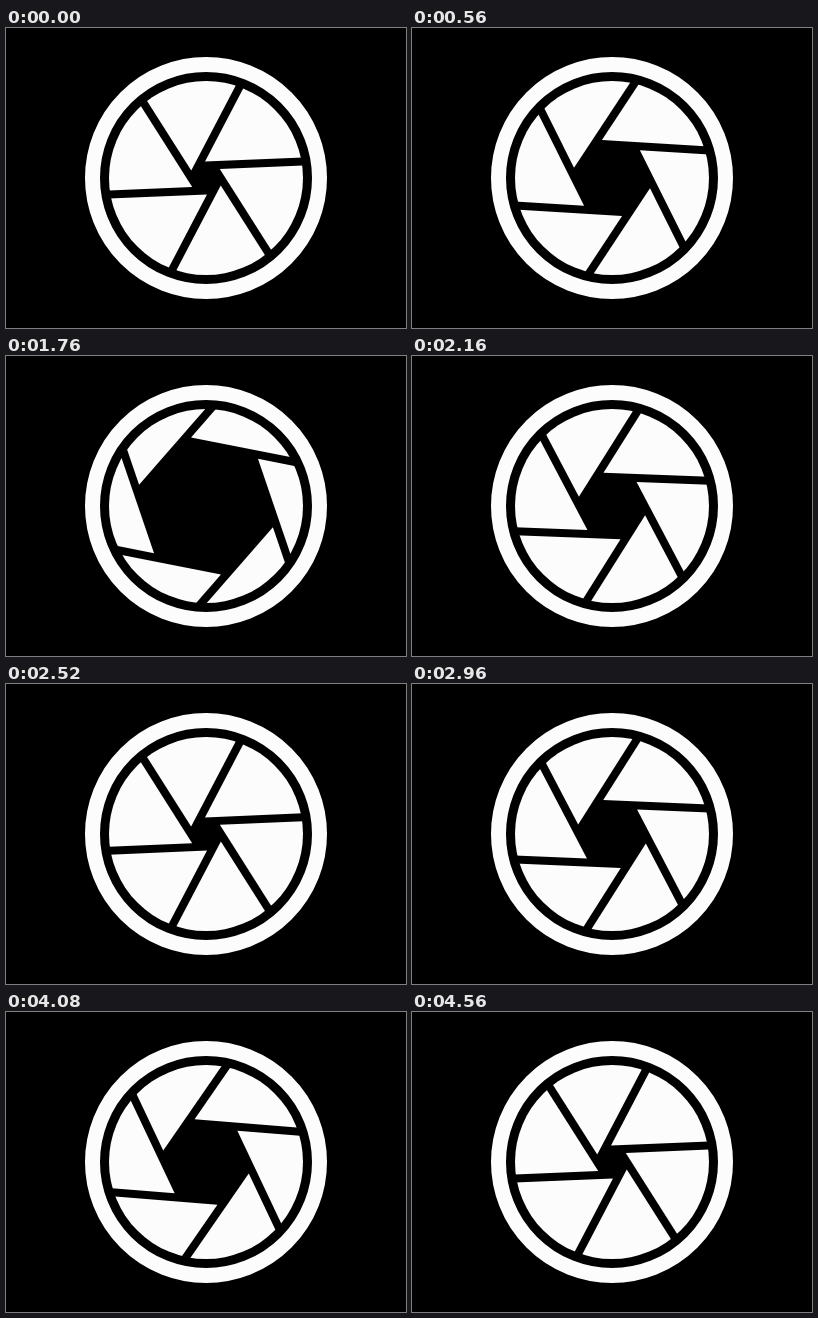
Recreate the animation shown at these times as an HTML page with a canvas. Size 400x300 px, loop 4.96 s.

```html
<!DOCTYPE html>
<html lang="en">
<head>
<meta charset="utf-8">
<title>Aperture</title>
<style>
  html, body { margin: 0; height: 100%; overflow: hidden; background: #000; }
  canvas { display: block; }
</style>
</head>
<body>
<canvas width="400" height="300"></canvas>
<script>
const ctx = document.querySelector('canvas').getContext('2d');
const LOOP = 4960, STEP = 40;
const HALF_GAP = 4;
const PIVOT = { x: -205, y: 21.1 };
// [time in ms, how far the blades are open]
const KEYS = [[0, 0], [100, 0], [1340, 1.05], [2550, 0], [3600, 0.79], [4560, 0], [LOOP, 0]];

const smooth = x => x * x * (3 - 2 * x);
const rad = deg => deg * Math.PI / 180;

function openness(t) {
  const i = KEYS.findIndex(([end]) => t < end);
  const [t0, a] = KEYS[i - 1], [t1, b] = KEYS[i];
  return a + (b - a) * smooth((t - t0) / (t1 - t0));
}

function disc(radius) {
  ctx.beginPath();
  ctx.arc(0, 0, radius, 0, 2 * Math.PI);
}

function draw(t) {
  const angle = rad(-2.4 + 17.9 * openness(t));
  // Distance of each blade edge from the centre, then the blade tip
  const dist = PIVOT.y * Math.cos(angle) - PIVOT.x * Math.sin(angle);
  const tipX = (dist / 2 - 1.5 * HALF_GAP) / Math.sin(rad(60));
  const tipY = dist + HALF_GAP;

  ctx.resetTransform();
  ctx.clearRect(0, 0, 400, 300);
  ctx.save();
  ctx.translate(200, 150);
  ctx.strokeStyle = ctx.fillStyle = '#fcfcfc';
  ctx.lineWidth = 15;
  disc(113.5);
  ctx.stroke();

  disc(97);
  ctx.clip();
  ctx.rotate(angle);
  for (let i = 0; i < 6; i++) {
    ctx.beginPath();
    ctx.moveTo(tipX, tipY);
    ctx.lineTo(tipX - 400, tipY);
    ctx.lineTo(tipX - 200, tipY + 400 * Math.sin(rad(60)));
    ctx.fill();
    ctx.rotate(rad(60));
  }
  ctx.restore();
}

function tick() {
  const t = performance.now() % LOOP;
  draw(Math.floor(t / STEP) * STEP);
  requestAnimationFrame(tick);
}
tick();
</script>
</body>
</html>
```
